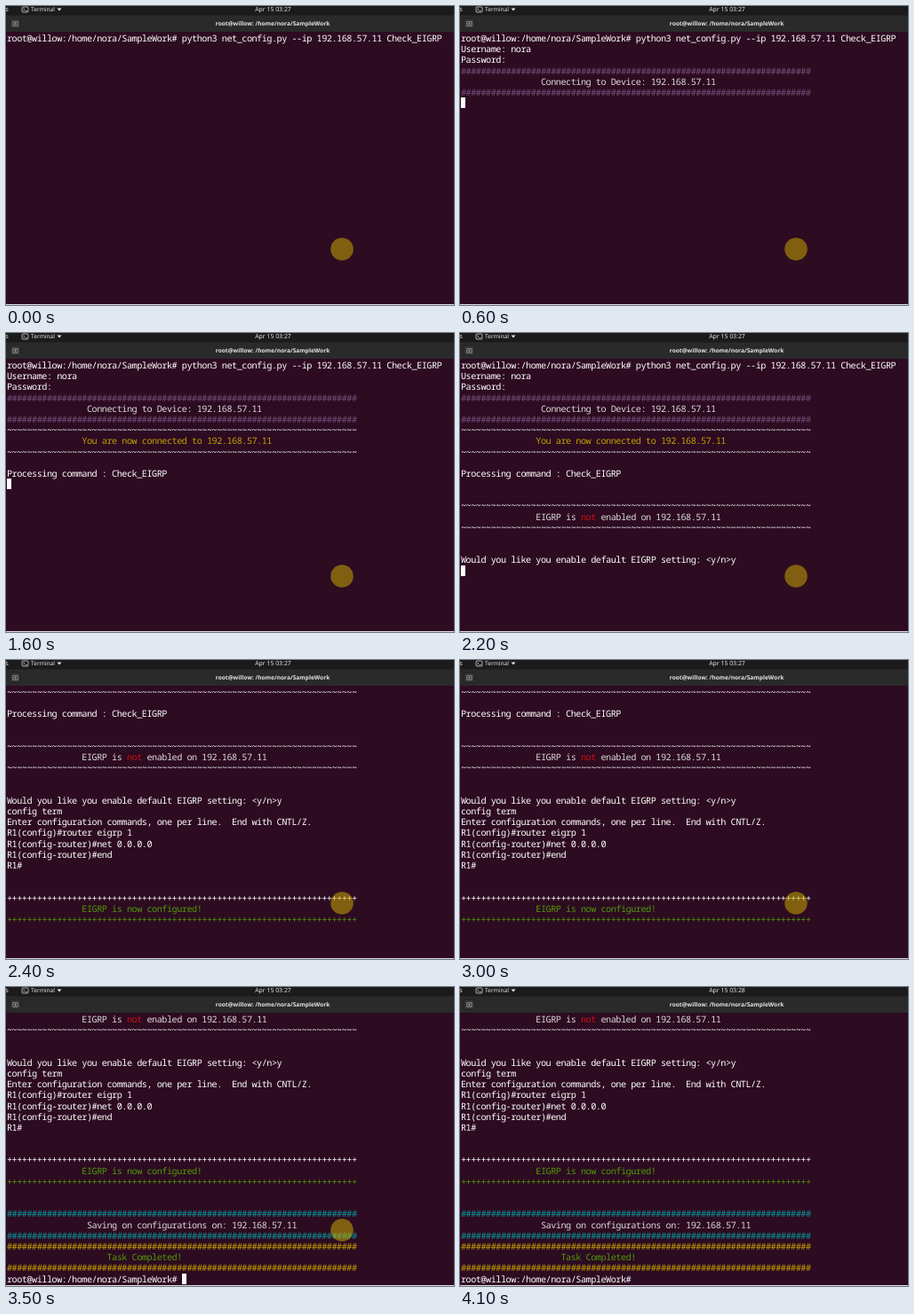
Animation of 504 by 337 pixels, one loop 4200 ms. Source, as an HTML page:

```html
<!DOCTYPE html>
<html lang="en">
<head>
<meta charset="utf-8">
<title>Terminal session</title>
<style>
  html, body { margin: 0; width: 100%; height: 100%; overflow: hidden; background: #2d0b21; }
  #stage { position: relative; width: 504px; height: 337px; overflow: hidden; background: #2d0b21; }
  svg { position: absolute; left: 0; top: 0; }
  svg text { font: 6.9px "Noto Sans", "Open Sans", sans-serif; fill: #e4e4e4; text-rendering: geometricPrecision; }
  #title { font-weight: 700; font-size: 6.6px; }
  #screen {
    position: absolute; left: 1px; top: 30px; margin: 0;
    font: 500 10.2px/12.2px "Noto Sans Mono", "DejaVu Sans Mono", monospace;
    letter-spacing: -.49px; font-variant-ligatures: none;
    text-rendering: geometricPrecision; white-space: pre;
  }
  #screen div { height: 12.2px; }
  #cursor { position: absolute; width: 5px; height: 12.2px; background: #fff; }
</style>
</head>
<body>
<div id="stage">
  <div id="screen"></div>
  <div id="cursor"></div>
  <svg width="504" height="337">
    <rect width="504" height="10.5" fill="#1b1b1b"/>
    <rect y="10.5" width="504" height="18.5" fill="#2b2a2b"/>
    <rect y="336" width="504" height="1" fill="#dcdadc"/>
    <text x="-.6" y="6.4">s</text>
    <g fill="none" stroke="#d0d0d0" stroke-width=".8">
      <rect x="18" y="1" width="7" height="6" rx="1"/>
      <path d="M19.5 2.7l1.4 1.2-1.4 1.2M21.6 5.5h2"/>
    </g>
    <text x="28" y="6.4" style="font-size:6.6px">Terminal</text>
    <path d="M57.5 2.5h5l-2.5 3z" fill="#e4e4e4"/>
    <text id="clock" x="300.5" y="6.4" text-anchor="middle"></text>
    <rect x="4.5" y="14" width="12" height="11.5" rx="2" fill="#343334" stroke="#222122"/>
    <path d="M7.8 22.3v-4.6h5.4v4.6zM10.5 18.7v2.6M9.2 20h2.6" fill="none" stroke="#b4b4b4" stroke-width=".7"/>
    <text id="title" x="300" y="22" text-anchor="middle">root@willow: /home/nora/SampleWork</text>
    <circle id="pointer" r="12.8" fill="rgb(211,181,0)" fill-opacity=".5"/>
  </svg>
</div>
<script>
const $ = id => document.getElementById(id);
const TICK = 100, LOOP = 4200, ROWS = 25, ROW_H = 12.2, COL_W = 5.63;
const WHITE = '#fff', GREY = '#dcdadb', PURPLE = '#75507b', YELLOW = '#c4a000',
      RED = '#cc1010', GREEN = '#4e9a06', TEAL = '#06989a';

// A line is a list of [text, colour] runs.
const line = (text = '', color = WHITE) => [[text, color]];
const rule = (char, color) => line(char.repeat(70), color);
const indent = (columns, text, color) => line(' '.repeat(columns) + text, color);

const host = '192.168.57.11';
const prompt = 'root@willow:/home/nora/SampleWork# ';
const lines = [
  line(`${prompt}python3 net_config.py --ip ${host} Check_EIGRP`),
  line('Username: nora'),
  line('Password: '),
  rule('#', PURPLE),
  indent(16, `Connecting to Device: ${host}`, GREY),
  rule('#', PURPLE),
  rule('~'),
  indent(15, `You are now connected to ${host}`, YELLOW),
  rule('~'),
  line(),
  line('Processing command : Check_EIGRP'),
  line(), line(),
  rule('~'),
  [[' '.repeat(15) + 'EIGRP is ', GREY], ['not', RED], [` enabled on ${host}`, GREY]],
  rule('~'),
  line(), line(),
  line('Would you like you enable default EIGRP setting: <y/n>y'),
  line('config term'),
  line('Enter configuration commands, one per line.  End with CNTL/Z.'),
  line('R1(config)#router eigrp 1'),
  line('R1(config-router)#net 0.0.0.0'),
  line('R1(config-router)#end'),
  line('R1#'),
  line(), line(),
  rule('+'),
  indent(15, 'EIGRP is now configured!', GREEN),
  rule('+', GREEN),
  line(), line(),
  rule('#', TEAL),
  indent(16, `Saving on configurations on: ${host}`, GREY),
  rule('#', TEAL),
  rule('#', YELLOW),
  indent(20, 'Task Completed!', GREEN),
  rule('#', YELLOW),
  line(prompt)
];

// First tick, last line, characters of it, cursor state on each tick.
const phases = [
  [0, 0, 99, '0'],
  [1, 1, 10, '1'],
  [2, 1, 12, '1'],
  [3, 1, 14, '1'],
  [4, 2, 10, '11'],
  [6, 6, 0, '101010'],
  [12, 11, 0, '10101'],
  [17, 18, 54, '10'],
  [19, 18, 55, '1'],
  [20, 19, 0, '1010'],
  [24, 32, 0, '01011001'],
  [32, 35, 0, '01'],
  [34, 38, 35, '01101010']
];

function lineElement(runs) {
  const row = document.createElement('div');
  for (const [text, color] of runs) {
    const span = document.createElement('span');
    span.textContent = text;
    span.style.color = color;
    row.append(span);
  }
  return row;
}

function draw(tick) {
  const [start, last, chars, blink] = phases.findLast(phase => phase[0] <= tick);
  const first = Math.max(0, last - ROWS + 1);
  const typed = line(lines[last][0][0].slice(0, chars));
  $('screen').replaceChildren(...[...lines.slice(first, last), typed].map(lineElement));

  const cursor = $('cursor').style;
  cursor.left = 1 + chars * COL_W + 'px';
  cursor.top = 30 + (last - first) * ROW_H + 'px';
  cursor.visibility = blink[tick - start] === '1' ? 'visible' : 'hidden';

  $('clock').textContent = tick < 39 ? 'Apr 15 03:27' : 'Apr 15 03:28';
  const [x, y] = tick < 40 ? [378, 274] : [403, 312];
  $('pointer').setAttribute('cx', x);
  $('pointer').setAttribute('cy', y);
  $('pointer').style.visibility = tick < 41 ? 'visible' : 'hidden';
}

const origin = performance.now();
let shown = -1;
function play() {
  const tick = Math.floor((performance.now() - origin) % LOOP / TICK);
  if (tick !== shown) draw(shown = tick);
  requestAnimationFrame(play);
}
play();
</script>
</body>
</html>
```
